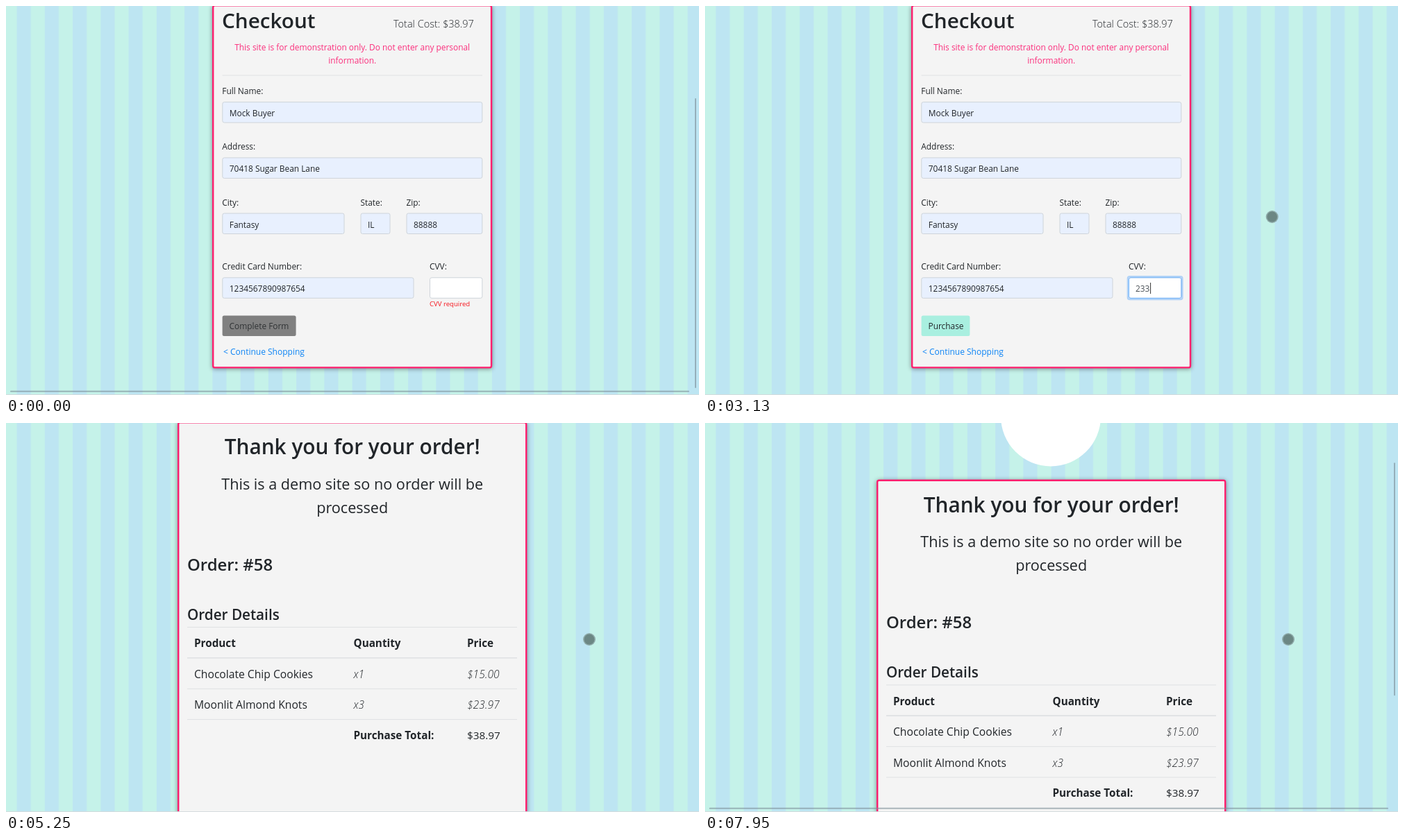
Write an HTML page that moves like this. It is 998 by 561 pixels and loops after 8000 ms.

```html
<!DOCTYPE html>
<html lang="en">
<head>
<meta charset="utf-8">
<title>Checkout</title>
<style>
  html, body { margin: 0; width: 100%; height: 100%; overflow: hidden; background: #c5f2e9; }
  svg { display: block; width: 998px; height: 561px; }
  text { font: 11.9px "Open Sans", "Noto Sans", sans-serif; fill: #212529; white-space: pre; }
  .card { fill: #f4f4f4; stroke: #ff1f6e; stroke-width: 2.4; filter: drop-shadow(0 1px 3px rgba(0,0,0,.42)); }
  .field { fill: #e8f0fe; stroke: #ced4da; }
  .rule { stroke: #dfe1e3; }
  .pink { fill: #fb2f7c; }
  .semi { font-weight: 600; }
  .bold { font-weight: 700; font-size: 15.25px; }
  .cell { font-size: 15.65px; }
  .italic { font-size: 15.6px; font-style: italic; font-weight: 300; }
  .mid { text-anchor: middle; }
  .ring { fill: none; stroke: #007bff; stroke-opacity: .28; stroke-width: 2.6; }
  .bar { stroke: #7d8f98; stroke-opacity: .62; stroke-width: 2; stroke-linecap: round; }
</style>
</head>
<body>
<svg id="stage" viewBox="0 0 998 561"></svg>
<script>
const LOOP = 8000;

const text = (x, y, str, cls = '', attrs = '') =>
  `<text x="${x}" y="${y}" class="${cls}" ${attrs}>${str}</text>`;
const sized = (px, extra = '') => `style="font-size:${px}px;${extra}"`;
const rect = (x, y, w, h, cls, attrs = '') =>
  `<rect x="${x}" y="${y}" width="${w}" height="${h}" rx="2.5" class="${cls}" ${attrs}/>`;
const rule = (x1, x2, y, width = 1) =>
  `<line x1="${x1}" x2="${x2}" y1="${y}" y2="${y}" class="rule" stroke-width="${width}"/>`;
const field = (x, right, y, label, value) =>
  text(x - .5, y - 11.5, label) + rect(x, y, right - x, 29.5, 'field') + text(x + 10, y + 20.5, value);
const row = (y, name, count, price) =>
  text(271, y, name, 'cell') + text(500.5, y, count, 'italic') + text(664, y, price, 'italic');

const background = `
  <defs><pattern id="stripes" x="15.6" width="40.25" height="561" patternUnits="userSpaceOnUse">
    <rect width="40.25" height="561" fill="#c5f2e9"/><rect width="20.1" height="561" fill="#bde5f2"/>
  </pattern></defs>
  <rect width="998" height="561" fill="url(#stripes)"/>`;

const checkout = `<g id="checkout">
  ${rect(298.2, -.6, 400.8, 522, 'card')}
  ${text(311, 32, 'Checkout', 'semi', sized(29.7))}
  ${text(558, 31, 'Total Cost: $38.97', '', sized(14.5, 'font-weight:300'))}
  ${text(498.7, 64, 'This site is for demonstration only. Do not enter any personal', 'pink mid')}
  ${text(498.7, 82.5, 'information.', 'pink mid')}
  ${rule(311.5, 686, 100)}
  ${field(311.8, 685.8, 138.6, 'Full Name:', 'Mock Buyer')}
  ${field(311.8, 685.8, 218.9, 'Address:', '70418 Sugar Bean Lane')}
  ${field(311.8, 487, 299, 'City:', 'Fantasy')}
  ${field(511, 553, 299, 'State:', 'IL')}
  ${field(577, 685.8, 299, 'Zip:', '88888')}
  ${field(311.8, 587, 391.8, 'Credit Card Number:', '1234567890987654')}
  ${text(610, 380.3, 'CVV:')}
  ${rect(610.5, 391.8, 75.3, 29.5, 'field', 'style="fill:#fff"')}
  <g id="cvvFocus">
    ${rect(610.5, 391.8, 75.3, 29.5, '', 'fill="none" stroke="#80bdff"')}
    ${rect(609, 390.2, 78.3, 32.7, 'ring')}
  </g>
  <text id="cvv" x="620" y="412.3" style="fill:#495057"></text>
  <rect id="caret" y="399" width="1" height="16" fill="#333"/>
  ${text(610, 433, 'CVV required', '', 'id="error" ' + sized(9.6, 'fill:#f5151d'))}
  <g id="disabled">
    ${rect(311.6, 446.5, 106, 29.6, '', 'fill="#808080"')}
    ${text(321.5, 466, 'Complete Form', '', 'style="fill:#2f3234"')}
  </g>
  <g id="purchase">
    ${rect(311.6, 446.5, 69.8, 29.6, '', 'fill="#a9efe0"')}
    ${text(321.5, 466, 'Purchase')}
  </g>
  ${rect(310.4, 445.3, 72.2, 32, '', 'id="buttonFocus" fill="none" stroke="#acd4f8" stroke-width="2.6"')}
  ${text(313, 503.3, '&lt; Continue Shopping', '', sized(12, 'fill:#0d84f5'))}
  <g id="menu">
    <rect id="menuBox" x="609" y="423" width="150" rx="2" fill="#fff"
      style="filter:drop-shadow(0 1px 1.5px rgba(0,0,0,.4))"/>
    ${['232', '233', '222'].map((s, i) =>
      text(618, 447 + 28 * i, s, 'option', sized(10, 'fill:#000'))).join('')}
  </g>
</g>`;

const order = `<g id="order">
  <circle cx="498" cy="-51" r="72" fill="#fff"/>
  ${rect(248.2, 41.4, 501, 700, 'card')}
  ${text(498.7, 87.3, 'Thank you for your order!', 'semi mid', sized(29.8))}
  ${text(498.7, 138, 'This is a demo site so no order will be', 'mid', sized(21.6))}
  ${text(498.7, 171.5, 'processed', 'mid', sized(21.6))}
  ${text(261, 254.5, 'Order: #58', 'semi', sized(23.9))}
  ${text(261, 325.8, 'Order Details', 'semi', sized(20.7))}
  ${rule(261, 736, 336.5) + rule(261, 736, 380.7, 1.6) + rule(261, 736, 425.3) + rule(261, 736, 469.6)}
  ${text(271, 365.3, 'Product', 'bold') + text(500.5, 365.3, 'Quantity', 'bold') + text(664, 365.3, 'Price', 'bold')}
  ${row(409.8, 'Chocolate Chip Cookies', 'x1', '$15.00')}
  ${row(454.2, 'Moonlit Almond Knots', 'x3', '$23.97')}
  ${text(500.5, 498, 'Purchase Total:', 'bold') + text(664, 498, '$38.97', '', sized(15.3))}
</g>`;

const overlay = `
  <rect y="560" width="998" height="1" fill="#d5dcde"/>
  <g id="bars">
    <line class="bar" x1="7" x2="983" y1="555.7" y2="555.7"/>
    <line class="bar" id="vertical" x1="993" x2="993"/>
  </g>
  <g id="pointer"><circle r="9" fill="#8fabaa"/><circle r="7.4" fill="#6c8784"/></g>`;

document.getElementById('stage').innerHTML = background + checkout + order + overlay;

const el = id => document.getElementById(id);
const show = (id, on) => el(id).setAttribute('opacity', Number(on));
const set = (id, attrs) => Object.entries(attrs).forEach(([k, v]) => el(id).setAttribute(k, v));

// Value of the latest [time, value] step reached at time t.
const at = (t, steps) => steps.reduce((value, [time, next]) => t >= time ? next : value, steps[0][1]);

const pointerSteps = [
  [0, null], [1070, [818, 318]], [2730, [820, 314]], [2850, [821, 311]], [3130, [816.7, 304]],
  [3280, [816, 303.5]], [3430, [623, 337]], [3560, [430, 370]], [3700, null],
  [4110, [362, 464]], [4970, null], [5250, [840, 312]]
];

function draw(t) {
  const ordered = t >= 5250;
  show('checkout', !ordered);
  show('order', ordered);

  const cvv = at(t, [[0, ''], [1195, '2'], [1750, '23'], [2730, '233']]);
  const complete = cvv.length === 3;
  el('cvv').textContent = cvv;
  el('caret').setAttribute('x', 620.7 + 6.8 * cvv.length);
  show('caret', at(t, [[0, 0], [1070, 1], [2330, 0], [2730, 1], [3280, 0], [3700, 1], [4260, 0]]));
  show('cvvFocus', at(t, [[0, 0], [1070, .6], [1195, 1], [4700, .5], [4820, 0]]));
  show('buttonFocus', at(t, [[0, 0], [4700, .5], [4820, 1]]));
  show('error', t < 1195);
  show('disabled', !complete);
  show('purchase', complete);

  const options = at(t, [[0, 0], [1195, 3], [1750, 2], [2730, 0]]);
  show('menu', options > 0);
  el('menuBox').setAttribute('height', 12.5 + 28 * options);
  document.querySelectorAll('.option').forEach((o, i) => o.setAttribute('opacity', i < options ? 1 : 0));

  const scroll = at(t, [[0, -42], [6090, 0], [6240, 35.8], [7950, 41.4]]);
  el('order').setAttribute('transform', `translate(0 ${scroll})`);
  const top = ordered ? 83 - .6 * scroll : 134;
  set('vertical', { y1: top, y2: top + (ordered ? 334 : 416) });
  show('bars', at(t, [[0, 1], [250, .75], [390, .5], [515, .25], [640, 0],
    [6090, 1], [6670, .5], [6800, 0], [7950, 1]]));

  const pointer = at(t, pointerSteps);
  show('pointer', pointer !== null);
  if (pointer) el('pointer').setAttribute('transform', `translate(${pointer})`);
}

const start = performance.now();
function tick() {
  draw((performance.now() - start) % LOOP);
  requestAnimationFrame(tick);
}
tick();
</script>
</body>
</html>
```
